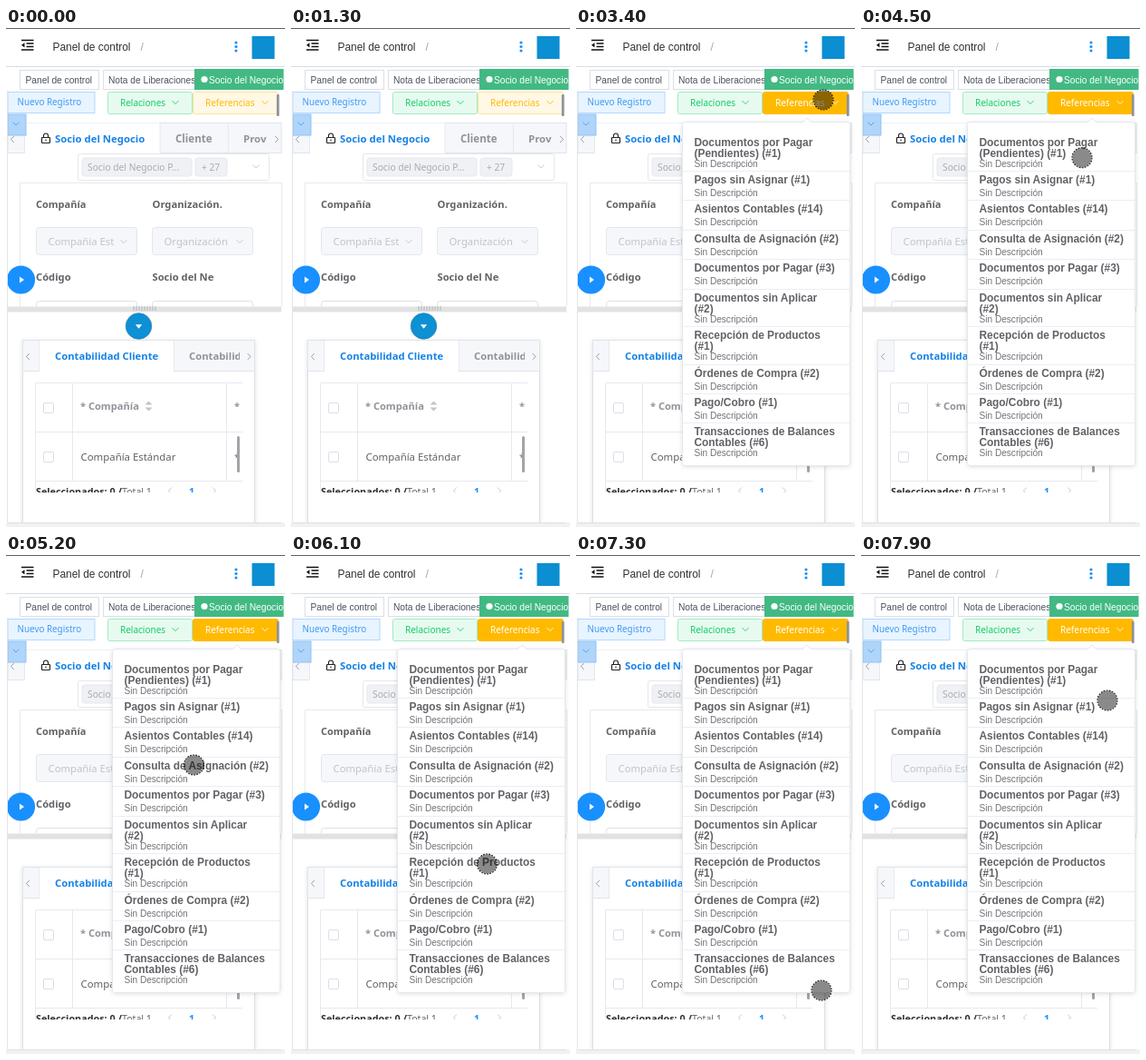
Recreate the animation shown at these times as an HTML page. Size 308 px wide and 549 px high, loop 8 s.

```html
<!DOCTYPE html>
<html lang="es">
<head>
<meta charset="utf-8">
<title>Panel de control</title>
<style>
  html, body { margin: 0; width: 100%; height: 100%; overflow: hidden; background: #fff; }
  svg { display: block; width: 100%; height: 100%; }
  text { font-family: "Noto Sans", "Open Sans", sans-serif; white-space: pre; }
  .arial { font-family: "Liberation Sans", Arial, sans-serif; }
  .line { fill: none; stroke: #e6e9ef; }
  .chev { fill: none; stroke-width: .9; stroke-linecap: round; stroke-linejoin: round; }
  .box { fill: #fff; stroke: #dcdfe6; }
  .bar { fill: #f5f7fa; stroke: #e0e4ea; }
  .off { fill: #f5f7fa; stroke: #e2e6ee; }
  .semi { font-weight: 600; }
  .bold { font-weight: 700; }
</style>
</head>
<body>
<svg id="stage" viewBox="0 0 308 549" xmlns="http://www.w3.org/2000/svg">
  <defs>
    <clipPath id="upper"><rect y="94" width="308" height="212"/></clipPath>
    <clipPath id="label"><rect x="160" y="262" width="70" height="20"/></clipPath>
    <clipPath id="prov"><rect x="250" y="105" width="38" height="33"/></clipPath>
    <clipPath id="tab"><rect x="190" y="346" width="68" height="30"/></clipPath>
    <clipPath id="table"><rect x="32" y="389" width="229" height="122"/></clipPath>
    <filter id="soft" x="-20%" y="-20%" width="140%" height="140%">
      <feDropShadow dx="0" dy="1" stdDeviation="2.5" flood-color="#000" flood-opacity=".12"/>
    </filter>
  </defs>
  <g id="page"></g>
  <g id="menu"></g>
  <g id="cursor">
    <circle r="10.7" fill="#000" fill-opacity=".46"/>
    <circle r="11" fill="none" stroke="#111" stroke-width="1.1" stroke-dasharray="1.7 1.44"/>
  </g>
</svg>
<script>
const $ = id => document.getElementById(id);
const blue = '#1890ff', gray = '#909399', dark = '#606266', pale = '#c0c4cc';

const text = (x, y, size, fill, str, cls = '') =>
  `<text x="${x}" y="${y}" font-size="${size}" fill="${fill}" class="${cls}">${str}</text>`;
const rect = (x, y, w, h, attrs) =>
  `<rect x="${x}" y="${y}" width="${w}" height="${h}" ${attrs}/>`;
const path = (d, attrs) => `<path d="${d}" ${attrs}/>`;
const clip = (id, body) => `<g clip-path="url(#${id})">${body}</g>`;
const chevron = (x, y, color, turn = 0) =>
  path('M-3.2-1.6L0 1.6L3.2-1.6', `class="chev" stroke="${color}" transform="translate(${x} ${y}) rotate(${turn})"`);
const left = (x, y, color = gray) => chevron(x, y, color, 90);
const right = (x, y, color = gray) => chevron(x, y, color, -90);

function header() {
  const dots = [16, 20.5, 25].map(y => `<circle cx="254" cy="${y}" r="1.6" fill="${blue}"/>`).join('');
  return rect(0, 0, 308, 1, 'fill="#59616c"') +
    path('M17 13.5H30.5M22.5 17H30.5M22.5 20.5H30.5M17 24H30.5', 'stroke="#111" stroke-width="1.4"') +
    path('M17 18.8L20.5 16.2V21.4Z', 'fill="#111"') +
    text(51.5, 25, 11.9, '#303133', 'Panel de control', 'arial') +
    text(148.5, 25, 12, '#97a8be', '/', 'arial') +
    dots + rect(271.5, 9, 25, 25, 'fill="#0b8ed2"') +
    path('M0 42.5H308', 'stroke="#d8dce5"') +
    rect(15.5, 46.5, 87, 21, 'class="box"') +
    text(21.5, 61, 10.2, '#495060', 'Panel de control', 'arial') +
    rect(107.5, 46.5, 106, 21, 'class="box"') +
    text(113, 61, 10.2, '#495060', 'Nota de Liberaciones', 'arial') +
    rect(208, 45, 98.5, 23, 'fill="#42b983"') +
    '<circle cx="219" cy="56.5" r="3.6" fill="#fff"/>' +
    text(224, 61, 10.2, '#fff', 'Socio del Negocio', 'arial');
}

function buttons() {
  return rect(2, 70.5, 96, 23, 'fill="#e8f4ff" stroke="#b3d8ff"') +
    text(12.5, 84.5, 9.85, '#3f9bf5', 'Nuevo Registro') +
    rect(112.5, 70.5, 93, 24, 'rx="2" fill="#e7faf0" stroke="#a1ebc2"') +
    text(126, 86, 10, '#13ce66', 'Relaciones') + chevron(187, 82, '#13ce66') +
    rect(206.5, 70.5, 94, 24, 'id="refs" rx="2" fill="#fff8e6" stroke="#ffe399"') +
    `<g id="refsText">${text(220, 86, 10, '#ffba00', 'Referencias')}${chevron(286, 82, '#ffba00')}</g>` +
    rect(298.8, 73, 2.8, 24, 'rx="1" fill="#8f9196"');
}

function mainTabs() {
  return rect(2, 104.5, 302, 33, 'class="bar"') +
    rect(20.5, 104.5, 149.5, 34, 'fill="#fff"') +
    path('M20.5 104V138M170 104V138M245.5 104V138', 'class="line"') +
    rect(2, 95, 20, 23, 'fill="#b0d5fa" stroke="#8fc1f3"') +
    chevron(11, 105.5, '#4e9fee') + left(7, 122.5) + right(299, 122.5) +
    rect(39.5, 120.5, 9, 6, 'rx=".8" fill="none" stroke="#222" stroke-width="1.2"') +
    path('M41.5 120V118.5A2.5 2.5 0 0 1 46.5 118.5V120M44 122.5V124.5', 'fill="none" stroke="#222" stroke-width="1.1"') +
    text(54, 126, 11.35, '#1683e6', 'Socio del Negocio', 'semi') +
    text(187, 126, 11.5, gray, 'Cliente', 'semi') +
    clip('prov', text(262, 126, 11.4, gray, 'Prov', 'semi'));
}

function form() {
  const field = (x, label) => rect(x + .5, 219.5, 111, 30, 'rx="3" class="off"') +
    text(x + 13.5, 239, 11.3, pale, label) + chevron(x + 97, 235, pale);
  return clip('upper',
    path('M15.5 306V170.5H304.5V306', 'class="line"') +
    rect(79.5, 138.5, 211, 29, 'rx="2" fill="#fff" stroke="#e4e7ed"') +
    rect(84, 143, 121, 20, 'rx="3" fill="#f0f1f4" stroke="#e6e8ec"') +
    text(90, 157, 10.25, '#a9abb0', 'Socio del Negocio P...') +
    rect(209, 143, 35, 20, 'rx="3" fill="#f0f1f4" stroke="#e6e8ec"') +
    text(216, 157, 10.2, '#a9abb0', '+ 27') + chevron(276, 152.5, pale) +
    text(33, 198, 11, dark, 'Compañía', 'bold') +
    text(161.5, 198, 11.2, dark, 'Organización.', 'bold') +
    field(33, 'Compañía Est') + field(161, 'Organización') +
    text(33, 278, 11.2, dark, 'Código', 'bold') +
    clip('label', text(161.5, 278, 11.2, dark, 'Socio del Negocio', 'bold')) +
    rect(33.5, 300.5, 111, 30, 'rx="3" class="box"') +
    rect(161.5, 300.5, 111, 30, 'rx="3" class="box"'));
}

function splitter() {
  let grip = '';
  for (let x = 141; x < 167; x += 3) grip += `M${x} 306V311`;
  return rect(2, 306.5, 302, 6, 'fill="#e2e2e2"') + path(grip, 'stroke="#b4b4b4"') +
    `<circle cx="16.5" cy="277" r="15.6" fill="${blue}"/>` + path('M15 273.5L20 277L15 280.5Z', 'fill="#fff"') +
    '<circle cx="146.5" cy="328" r="14.3" fill="#0d90d4" stroke="#2c7fae" stroke-width=".7"/>' +
    path('M142.8 326.3H150.2L146.5 330.8Z', 'fill="#fff"');
}

function details() {
  const check = y => rect(41.5, y + .5, 11, 11, 'rx="1.5" class="box"');
  return rect(18.5, 343.5, 256, 210, 'fill="#fff" stroke="#dcdfe6" filter="url(#soft)"') +
    rect(18.5, 343.5, 256, 34, 'class="bar"') + rect(37, 344, 148, 34, 'fill="#fff"') +
    path('M36.5 344V377M185.5 344V377', 'class="line"') +
    left(24, 361.5) + right(268.5, 361.5) +
    text(54, 365, 11.25, '#1683e6', 'Contabilidad Cliente', 'semi') +
    clip('tab', text(202, 365, 11.25, gray, 'Contabilidad', 'semi')) +
    clip('table',
      path('M32.5 511V390.5H261M32 444.5H261M32 498.5H261M73.5 390V498M243.5 390V498', 'class="line"') +
      check(412) + check(466) +
      text(82, 420, 11.1, gray, '* Compañía', 'semi') +
      path('M153.5 414.5L157.5 410.5L161.5 414.5ZM153.5 417.5L157.5 421.5L161.5 417.5Z', `fill="${pale}"`) +
      text(252, 420, 11.1, gray, '*', 'semi') +
      text(82.5, 476, 11.4, dark, 'Compañía Estándar') + text(252, 476, 11.4, dark, '*') +
      rect(255, 449, 3, 40, 'rx="1.5" fill="#a2a4a8"') +
      text(33, 513.5, 10.8, '#303133', 'Seleccionados: 0 /', 'bold') +
      text(128, 513.5, 10.6, dark, 'Total 1') +
      left(181, 509, pale) + right(230, 509, pale) +
      text(202, 513.5, 10.6, blue, '1', 'bold')) +
    rect(0, 544, 308, 5, 'fill="#f1f1f1"') +
    path('M2 544.5H304', 'stroke="#dcdfe6"') + path('M1.5 69V544', 'stroke="#e3e5e9"');
}

const items = [
  'Documentos por Pagar|(Pendientes) (#1)', 'Pagos sin Asignar (#1)', 'Asientos Contables (#14)',
  'Consulta de Asignación (#2)', 'Documentos por Pagar (#3)', 'Documentos sin Aplicar|(#2)',
  'Recepción de Productos|(#1)', 'Órdenes de Compra (#2)', 'Pago/Cobro (#1)',
  'Transacciones de Balances|Contables (#6)'
];

function menu() {
  let y = 129.6;
  let out = rect(117.5, 103.5, 185, 378, 'rx="3" fill="#fff" stroke="#e4e7ed" filter="url(#soft)"') +
    path('M250 104L255 99L260 104', 'fill="#fff" stroke="#e4e7ed"');
  items.forEach((item, i) => {
    const lines = item.split('|');
    if (i) out += path(`M118 ${Math.round(y - 14) + .5}H302`, 'stroke="#ebeef5"');
    lines.forEach((line, n) => out += text(130.5, y + n * 12, 11.9, dark, line, 'arial bold'));
    out += text(130.5, y + (lines.length > 1 ? 23.2 : 14), 10.1, '#707277', 'Sin Descripción', 'arial');
    y += lines.length > 1 ? 41.5 : 32.35;
  });
  return out;
}

$('page').innerHTML = header() + buttons() + mainTabs() + form() + splitter() + details();
$('menu').innerHTML = menu();

// Each move: start, steps, then start, bend and end points of a curve.
const LOOP = 8000, STEP = 100, OPEN = 3400;
const moves = [
  [500, 2, [309, 90], [290, 83], [271, 76]],
  [900, 4, [271, 76], [289, 88], [306, 98]],
  [1900, 5, [300, 93], [278, 62], [273, 79]],
  [4400, 4, [273, 79], [245, 175], [213, 142]],
  [4900, 9, [213, 142], [203.6, 267.6], [208.5, 278.5]],
  [6100, 1, [210, 279], [213, 310], [216.5, 340]],
  [6300, 1, [216.5, 340], [244, 338], [270.5, 337]],
  [6500, 9, [270.5, 337], [277, 448.6], [271, 479]],
  [7600, 4, [271, 479], [240, 300], [272, 160]]
];
const shown = t => t >= 500 && t < 1300 || t >= 1900;

function cursorAt(t) {
  const [start, steps, a, b, c] = moves.filter(m => m[0] <= t).pop() || moves[0];
  const p = Math.min(1, Math.max(0, (Math.floor((t - start) / STEP) + 1) / steps));
  const q = 1 - p;
  return a.map((v, i) => q * q * v + 2 * p * q * b[i] + p * p * c[i]);
}

function paint(t) {
  const open = t >= OPEN;
  $('menu').style.display = open ? '' : 'none';
  $('refs').style.fill = $('refs').style.stroke = open ? '#ffba00' : '';
  for (const el of $('refsText').children)
    el.style[el.tagName === 'text' ? 'fill' : 'stroke'] = open ? '#fff' : '';
  $('cursor').style.display = shown(t) ? '' : 'none';
  $('cursor').setAttribute('transform', `translate(${cursorAt(t).join(' ')})`);
}

const begin = performance.now();
function tick() {
  paint((performance.now() - begin) % LOOP);
  requestAnimationFrame(tick);
}
paint(0);
requestAnimationFrame(tick);
</script>
</body>
</html>
```
